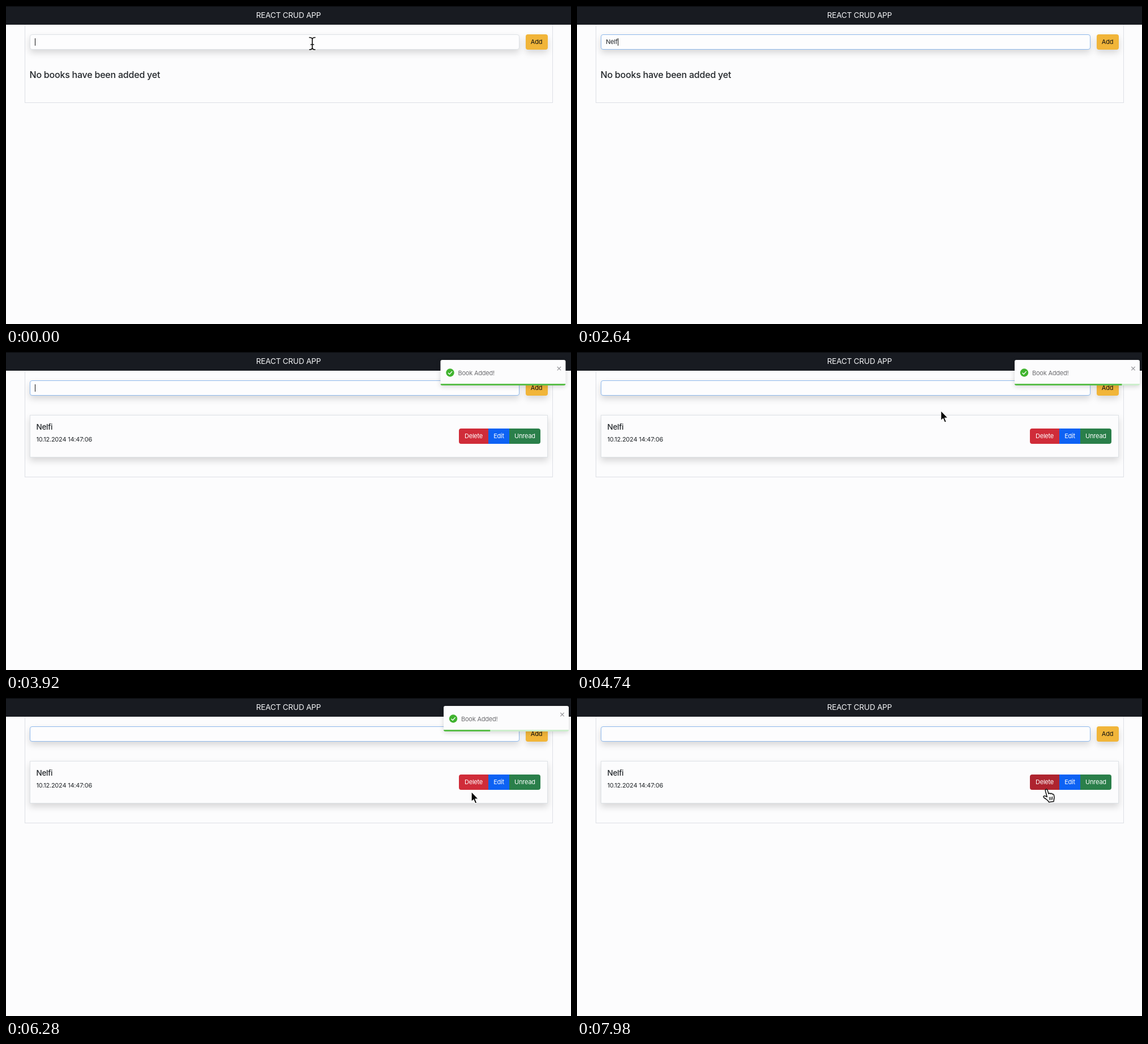
An HTML page for the animation above (8000 ms loop, 998 px wide and 561 px high).

```html
<!DOCTYPE html>
<html lang="en">
<head>
<meta charset="utf-8">
<title>React CRUD App</title>
<style>
  html, body { margin: 0; width: 100%; height: 100%; overflow: hidden; background: #fcfcfd; }
  body { position: relative; font: 400 11px/16px Inter, sans-serif; letter-spacing: -.02em; color: #212529; }
  body * { position: absolute; box-sizing: border-box; white-space: pre; }
  #bar { left: 0; top: 0; width: 998px; height: 32.5px; background: #181b21; border-top: 1px solid #08090c;
    color: #f3f4f6; font-size: 13.6px; line-height: 31px; text-align: center; }
  #frame { left: 32.5px; top: 31px; width: 933px; border: 1px solid #dddfe5; border-top: 0; }
  .shadow { box-shadow: 0 5.6px 11.2px rgba(0, 0, 0, .15); }
  #input { left: 41.5px; top: 50px; width: 865px; height: 27px; border: 1px solid #dee2e6; border-radius: 4px;
    background: #fdfdfe; }
  #typed { left: 8.5px; top: 0; line-height: 25px; }
  #caret { position: static; display: inline-block; width: 1px; height: 13px; vertical-align: -2.5px; background: #111; }
  .button { height: 27px; line-height: 27px; text-align: center; color: #fff; }
  #add { left: 917.5px; top: 50px; width: 39px; border-radius: 4px; background: #f1b539; color: #111; }
  #empty { left: 41.5px; top: 109px; font-size: 16px; font-weight: 500; line-height: 24px; }
  #card { left: 41.5px; top: 111px; width: 915px; height: 74.5px; border: 1px solid #dee2e6; background: #fcfcfd; }
  #title { left: 11px; top: 11px; font-size: 13.4px; font-weight: 500; line-height: 18px; }
  #date { left: 11px; top: 34px; }
  #delete { left: 757.5px; top: 23px; width: 52px; border-radius: 4px 0 0 4px; }
  #edit { left: 809px; top: 23px; width: 38px; background: #0d62f4; }
  #unread { left: 846.5px; top: 23px; width: 55px; border-radius: 0 4px 4px 0; background: #2a7f4a; }
  #toast { left: 773px; top: 14px; width: 221px; height: 45px; border-radius: 3px; background: #fcfcfd;
    box-shadow: 0 2px 9px rgba(0, 0, 0, .16); overflow: hidden; color: #6d6d70; }
  #toast span { left: 31px; top: 14.5px; }
  #toast svg { left: 0; top: 0; }
  #track { left: 0; bottom: 0; width: 100%; height: 3.5px; background: #cdeecd; }
  #progress { left: 0; top: 0; width: 100%; height: 100%; background: #5bbf4b; transform-origin: left; }
  #pointer { left: 0; top: 0; overflow: visible; }
</style>
</head>
<body>
<div id="frame"></div>
<div id="bar">REACT CRUD APP</div>
<div id="input" class="shadow"><div id="typed"><span id="word" style="position:static"></span><i id="caret"></i></div></div>
<div id="add" class="button shadow">Add</div>
<div id="empty">No books have been added yet</div>
<div id="card" class="shadow">
  <div id="title"></div>
  <div id="date">10.12.2024 14:47:06</div>
  <div id="delete" class="button">Delete</div>
  <div id="edit" class="button">Edit</div>
  <div id="unread" class="button">Unread</div>
</div>
<div id="toast">
  <svg width="221" height="45" fill="none">
    <circle cx="17" cy="22.5" r="7.2" fill="#40b32f"/>
    <path d="M13.5 22.7l2.6 2.6 4.5-5.2" stroke="#fff" stroke-width="1.4"/>
    <path d="M206.3 12l6.4 6.4m0-6.4l-6.4 6.4" stroke="#9a9a9e" stroke-width="1.3"/>
  </svg>
  <span>Book Added!</span>
  <div id="track"><div id="progress"></div></div>
</div>
<svg id="pointer" width="1" height="1" stroke-linejoin="round" stroke-linecap="round">
  <g id="beam" fill="none">
    <path id="beamLine" d="M-5-10.5Q-.5-10.5 0-7.5Q.5-10.5 5-10.5M0-7.5V8M-5 11Q-.5 11 0 8Q.5 11 5 11M-2.5 2H2.5" stroke="#fff" stroke-width="3.4"/>
    <use href="#beamLine" style="display:none"/>
    <path d="M-5-10.5Q-.5-10.5 0-7.5Q.5-10.5 5-10.5M0-7.5V8M-5 11Q-.5 11 0 8Q.5 11 5 11M-2.5 2H2.5" stroke="#111" stroke-width="1.7"/>
  </g>
  <path id="arrow" d="M0 0V18L4 14.4 6.8 21.2 9.8 20 7 13.2H12.6Z" fill="#050505" stroke="#fff" stroke-width="1.3"/>
  <g id="hand" transform="translate(-5 0)" stroke="#111" stroke-width="1.5">
    <path d="M7.3 14.5L4.3 3.8Q3.9 1.3 5.7 .9Q7.5 .6 8.2 3L10 9Q10.8 7.6 12.4 8.3L13.1 9.1Q14.5 7.7 15.9 8.8L16.4 9.7Q18.6 9 19.4 11.3Q20.8 16 19.6 19L19 22.6L10.6 23.7L8.7 21Q5 17.6 2 16Q.1 14 1.6 13Q4 12.2 7.3 14.5Z" fill="#fff"/>
    <path d="M11.3 15.2l.9 4.6M14 14.8l.7 4.6M16.6 14.4l.5 4.5" fill="none" stroke-width="1.2"/>
  </g>
</svg>
<script>
const LOOP = 8000;
const TICK_MS = 73.5;
const BOOK = 'Nelfi';
const KEYS = [1300, 1680, 2120, 2640, 2900];
const ADDED = 80, BAR_START = 93.3, BAR_END = 161.3;   // in steps
const POINTER = [                  // time, x, y, shape
  [0, 541, 66, 'beam'], [1300, 541, 66, ''],
  [4420, 541, 66, 'beam'], [4600, 575, 78, 'arrow'], [4900, 720, 132, 'arrow'],
  [5160, 822, 158, 'hand'], [5440, 825, 165, 'hand'],
  [5640, 822, 165, 'arrow'], [7440, 822, 165, 'arrow'],
  [7640, 827, 161, 'hand'], [7880, 828, 160, 'hand'], [LOOP, 828, 160, 'hand'],
];
const ENTER = [[0, 3000, 0], [.6, -25, 1], [.75, 10, 1], [.9, -5, 1], [1, 0, 1]];
const LEAVE = [[0, 0, 1], [.2, -20, 1], [1, 2000, 0]];

const el = Object.fromEntries([...document.querySelectorAll('[id]')].map(e => [e.id, e]));
const show = (e, on) => { e.style.display = on ? '' : 'none'; };
const clamp = v => Math.min(1, Math.max(0, v));
const easeOut = p => 1 - (1 - p) ** 3;

// Steps come in threes, lasting 100, 20 and 20 ms.
function stepAt(t) {
  const u = t + 120, r = u % 140;
  return 3 * Math.floor(u / 140) + (r < 100 ? 0 : r < 120 ? 1 : 2);
}

function stepStart(n) {
  return Math.max(0, Math.floor(n / 3) * 140 + [0, 100, 120][n % 3] - 120);
}

function sample(rows, at, ease) {
  let i = 0;
  while (i < rows.length - 2 && rows[i + 1][0] <= at) i++;
  const [a, b] = [rows[i], rows[i + 1]];
  const p = ease(clamp((at - a[0]) / (b[0] - a[0])));
  return { x: a[1] + (b[1] - a[1]) * p, y: a[2] + (b[2] - a[2]) * p, shape: a[3] };
}

function drawToast(n) {
  const leaving = n >= BAR_END;
  const part = (n - (leaving ? BAR_END : ADDED)) * TICK_MS / 700;
  show(el.toast, n >= ADDED && !(leaving && part >= 1));
  const { x, y } = sample(leaving ? LEAVE : ENTER, clamp(part), easeOut);
  el.toast.style.transform = `translateX(${x * .7}px)`;
  el.toast.style.opacity = y;
  el.progress.style.transform = `scaleX(${clamp((BAR_END - n) / (BAR_END - BAR_START))})`;
}

function drawPointer(t) {
  const { x, y, shape } = sample(POINTER, t, p => p);
  for (const name of ['beam', 'arrow', 'hand']) show(el[name], name === shape);
  el.pointer.style.transform = `translate(${x}px, ${y}px)`;
  el.delete.style.background = shape === 'hand' ? '#ae242f' : '#d02c39';
}

function draw(time) {
  const n = stepAt(time), t = stepStart(n);
  const added = n >= ADDED;
  const count = added ? 0 : KEYS.filter(k => k <= t).length;
  const blink = ((n - 92.5) % 12 + 12) % 12 < 6;
  const justTyped = !added && KEYS.some(k => t >= k && t < k + 320);

  el.word.textContent = BOOK.slice(0, count);
  el.caret.style.visibility = blink || justTyped ? 'visible' : 'hidden';
  el.input.style.borderColor = n < 3 ? '#dee2e6' : n < 4 ? '#b2cdf2' : '#8fb9ec';
  el.frame.style.height = added ? '189.5px' : '140px';
  show(el.empty, !added);
  show(el.card, added);
  drawToast(n);
  drawPointer(t);
}

el.title.textContent = BOOK;
const start = performance.now();
function loop() {
  draw((performance.now() - start) % LOOP);
  requestAnimationFrame(loop);
}
loop();
</script>
</body>
</html>
```
